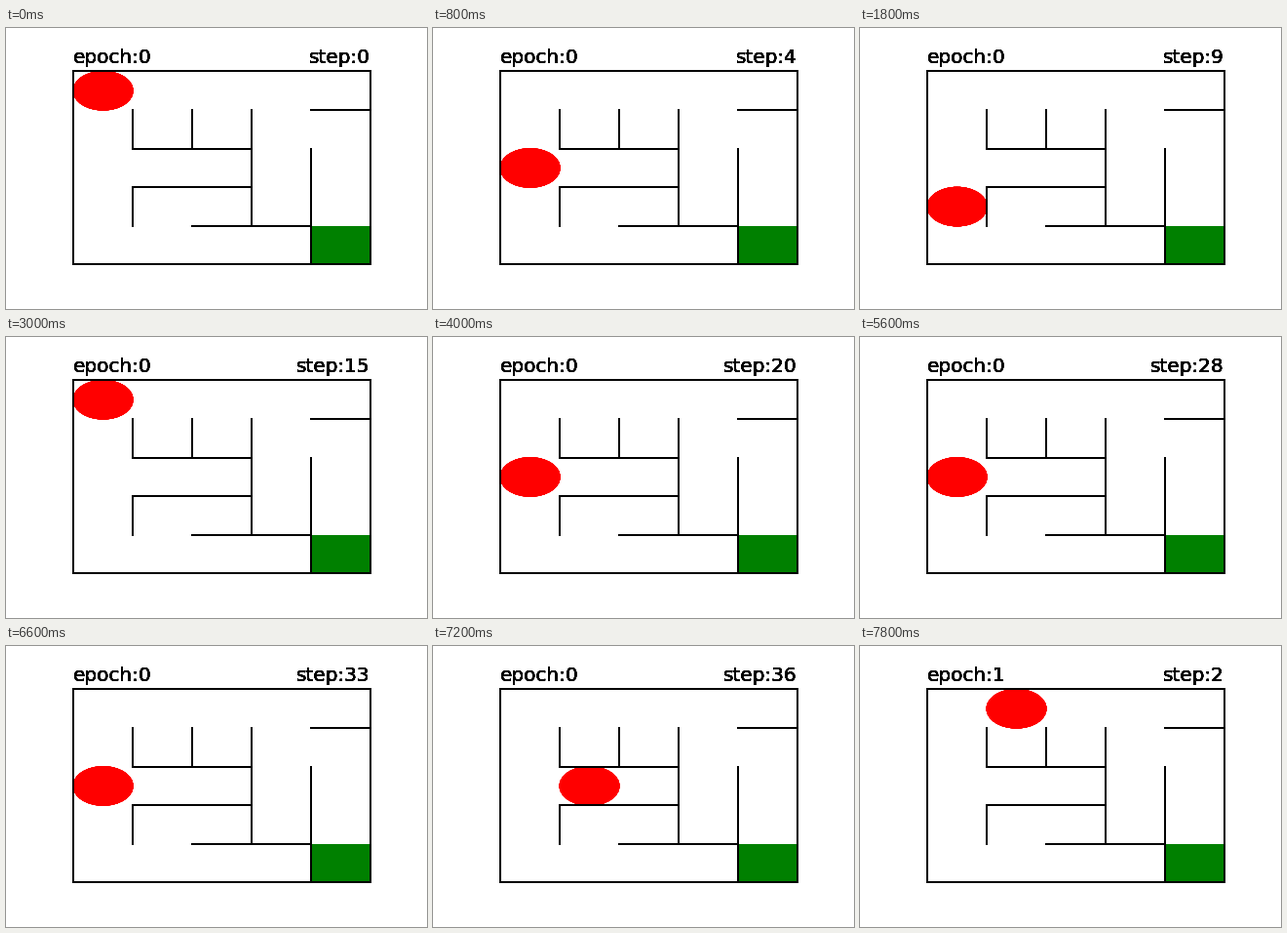
Recreate the animation shown at these times as a matplotlib script. Size 432 by 288 pixels, loop 8 s.

```python
import matplotlib.pyplot as plt
import numpy as np
from matplotlib.animation import FuncAnimation
from matplotlib.patches import Circle, Rectangle

SIZE = 5
STEP_MS = 200
PASSES = 8  # overdrawing hardens the soft edges

# key cells of each epoch: (step, column, row), rows counted from the top
ROUTES = [
    [(0, 0, 0), (6, 0, 3), (9, 0, 3), (10, 0, 4), (11, 0, 4), (15, 0, 0),
     (24, 0, 4), (28, 0, 2), (31, 0, 3), (33, 0, 2), (36, 1, 2)],
    [(0, 0, 0), (2, 1, 0)],
]

# corner points of the walls
WALLS = [
    [(0, 0), (SIZE, 0), (SIZE, SIZE), (0, SIZE), (0, 0)],
    [(1, 1), (1, 2), (3, 2)],
    [(1, 4), (1, 3), (3, 3)],
    [(2, 1), (2, 2)],
    [(3, 1), (3, 4)],
    [(2, 4), (4, 4)],
    [(4, 2), (4, 5)],
    [(4, 1), (5, 1)],
]


def walk():
    """List (epoch, step, column, row) for every frame."""
    states = []
    for epoch, route in enumerate(ROUTES):
        steps, cols, rows = zip(*route)
        for step in range(steps[-1] + 1):
            col, row = (round(np.interp(step, steps, v)) for v in (cols, rows))
            states.append((epoch, step, col, row))
    return states


def label(x, align):
    return ax.text(x, 5.22, "", fontsize=20, ha=align)


plt.rcParams["font.family"] = "DejaVu Sans"
fig = plt.figure(figsize=(6, 4), dpi=72, facecolor="white")
ax = fig.add_axes([0.125, 0.11, 0.775, 0.77])

ax.add_patch(Rectangle((SIZE - 1, 0), 1, 1, color="green"))
balls, epoch_labels, step_labels = [], [], []
for _ in range(PASSES):
    for wall in WALLS:
        xs, ys = np.transpose(wall)
        ax.plot(xs, SIZE - ys, color="black", lw=1.5, solid_joinstyle="miter")
    balls.append(ax.add_patch(Circle((0.5, 4.5), 0.5, color="red")))
    epoch_labels.append(label(0, "left"))
    step_labels.append(label(SIZE, "right"))

ax.set_xlim(-0.25, 5.25)
ax.set_ylim(-0.35, 5.25)
ax.axis("off")

STATES = walk()


def update(frame):
    epoch, step, col, row = STATES[frame]
    for ball, left, right in zip(balls, epoch_labels, step_labels):
        ball.center = (col + 0.5, SIZE - row - 0.5)
        left.set_text(f"epoch:{epoch}")
        right.set_text(f"step:{step}")
    return balls + epoch_labels + step_labels


anim = FuncAnimation(fig, update, frames=len(STATES), init_func=lambda: update(0),
                     interval=STEP_MS, repeat=True, repeat_delay=0)
plt.show()
```
